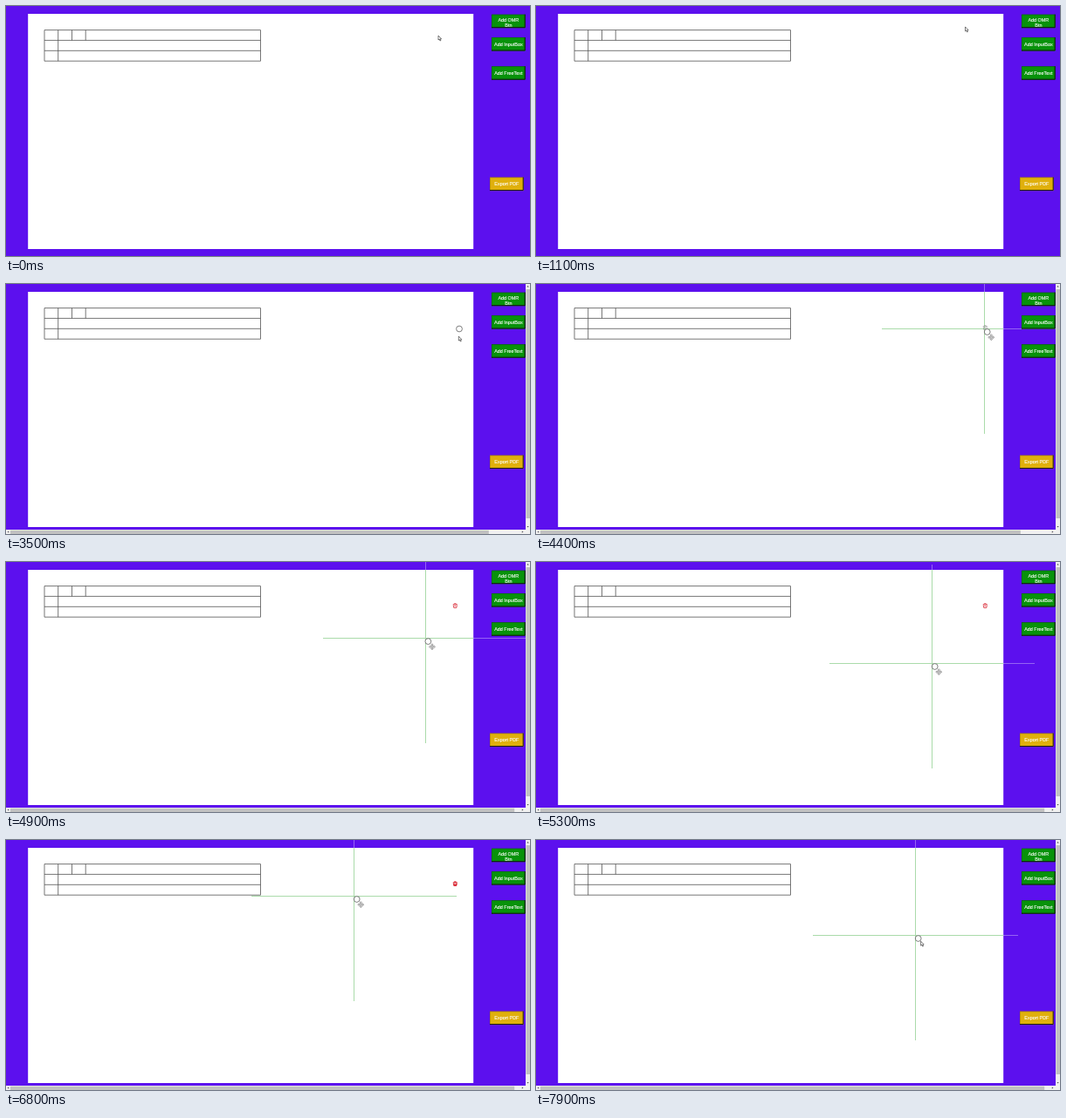
Animation of 600 by 287 pixels, one loop 8 s. Source, as an HTML page:

```html
<!DOCTYPE html>
<html lang="en">
<head>
<meta charset="utf-8">
<title>Form template editor</title>
<style>
  html, body { margin: 0; width: 100%; height: 100%; overflow: hidden; background: #5c10ee; }
  svg { display: block; width: 100%; height: 100%; }
  text { font: 5.45px "Liberation Sans", Arial, sans-serif; fill: #fff; stroke: #fff; stroke-width: .12; text-anchor: middle; }
  .table { fill: none; stroke: #555; stroke-width: .8; }
  .off { display: none; }
</style>
</head>
<body>
<svg viewBox="0 0 600 287">
  <defs>
    <clipPath id="sheet"><rect x="25" y="9" width="510" height="270"/></clipPath>
  </defs>
  <rect width="600" height="287" fill="#5c10ee"/>
  <rect x="25.2" y="9" width="510" height="270" fill="#fff"/>
  <path class="table" d="M44 27.6H291.5V63.2H44ZM44 39.4H291.5M44 51.3H291.5M59.7 27.6V63.2M75.5 27.6V39.4M91.2 27.6V39.4"/>

  <g id="guides">
    <path stroke="#fff" stroke-opacity=".35"/>
    <path stroke="#aadbaa" clip-path="url(#sheet)"/>
  </g>
  <g id="trash" stroke-width=".8">
    <path d="M511.8 48.7H516.8M512.8 48.4L513.6 47.8H515L515.8 48.4M512.2 49.4L512.8 52.6H515.8L516.4 49.4"/>
    <path d="M513.4 50.4H515.2"/>
  </g>
  <circle id="bubble" r="3.4" fill="#fff" stroke="#555" stroke-width=".75"/>

  <g id="buttons"></g>

  <g id="bars">
    <path d="M595 0H600V287H0V282H595Z" fill="#f1f1f1"/>
    <rect x="595.5" y="6" width="4.5" height="263" fill="#c1c1c1"/>
    <rect id="thumb" x="5" y="282.7" height="4.3" fill="#c1c1c1"/>
    <path d="M596.5 3.4L597.6 1.8L598.7 3.4ZM596.5 278L597.6 279.6L598.7 278ZM3.2 283.5L1.6 284.6L3.2 285.7ZM590.8 283.5L592.4 284.6L590.8 285.7Z" fill="#505050"/>
  </g>

  <g id="cursors" stroke="#222" stroke-linejoin="round" stroke-width=".6" fill="#fff">
    <path id="arrow" d="M-1.7 -3V2L-.5 1L.3 3L1.2 2.6L.4 .8H1.9Z"/>
    <path id="hand" d="M-1.7 -2.6Q-1 -3.6 -.3 -2.6V-.4L1.7 .1Q2.3 .4 2.1 1.3L1.6 3.8H-1.4L-3 1.2Q-2.9 .3 -1.7 1.2Z"/>
    <path id="move" stroke="#666" stroke-width=".5" fill="#eee" d="M0 -3.6L1.3 -2.1H.5V-.5H2.1V-1.3L3.6 0L2.1 1.3V.5H.5V2.1H1.3L0 3.6L-1.3 2.1H-.5V.5H-2.1V1.3L-3.6 0L-2.1 -1.3V-.5H-.5V-2.1H-1.3Z"/>
  </g>
</svg>
<script>
const LOOP = 8000, STEP = 100;
const ADD = 2900, HOVER = 4000, GRAB = 4200, DROP = 7900;
const GRIP = { x: 7.8, y: 9.7 };
const $ = id => document.getElementById(id);

// key points: time, x, y
const drag = [
  [GRAB, 515.8, 48], [4400, 513.5, 51.5], [5300, 453.5, 116.5], [5500, 443, 120.5],
  [6300, 393.5, 72], [6800, 398.5, 64.5], [7400, 401, 91.5], [DROP, 434.5, 109.5]
];
const approach = [
  [400, 496.7, 37], [600, 476, 24], [1000, 490, 27], [1900, 584.4, 25], [ADD, 582, 23],
  [3500, 520, 63], [GRAB, drag[0][1] + GRIP.x, drag[0][2] + GRIP.y]
];

const linear = p => p;
const smooth = p => p * p * (3 - 2 * p);

function along(keys, t, ease) {
  const i = keys.findIndex(k => k[0] > t);
  if (i === 0) return { x: keys[0][1], y: keys[0][2] };
  const [a, b] = i < 0 ? [keys.at(-1), keys.at(-1)] : [keys[i - 1], keys[i]];
  const p = ease((t - a[0]) / (b[0] - a[0] || 1));
  return i < 0 ? { x: a[1], y: a[2] }
    : { x: a[1] + (b[1] - a[1]) * p, y: a[2] + (b[2] - a[2]) * p };
}

function button(x, y, fill, lines, drop = 0) {
  const w = 38.7, h = 15.5, mid = y + h / 2 + 1.8 + drop;
  const labels = lines.map((s, i) =>
    `<text x="${x + w / 2}" y="${mid + (i - (lines.length - 1) / 2) * 6}">${s}</text>`).join("");
  return `<rect x="${x}" y="${y}" width="${w}" height="${h}" fill="${fill}"/>
    <path d="M${x + .3} ${y + h}V${y + .3}H${x + w}" fill="none" stroke="#000" stroke-opacity=".35" stroke-width=".6"/>
    <path d="M${x} ${y + h - .5}H${x + w - .5}V${y}" fill="none" stroke="#111"/>${labels}`;
}

const GREEN = "#08920a";
$("buttons").innerHTML =
  button(556, 9.7, GREEN, ["Add OMR", "Btn"], 1.4) +
  button(556, 36, GREEN, ["Add InputBox"]) +
  button(556, 69.2, GREEN, ["Add FreeText"]) +
  button(554, 196.6, "#e0b00c", ["Export PDF"]);

const show = (id, on) => $(id).classList.toggle("off", !on);
const place = (id, p) => $(id).setAttribute("transform", `translate(${p.x} ${p.y})`);
const pixel = v => Math.floor(v) + .5;

function draw(time) {
  const t = Math.floor(time % LOOP / STEP) * STEP;
  const cross = along(drag, t, linear);
  const pointer = t < GRAB ? along(approach, t, smooth)
    : { x: cross.x + GRIP.x, y: cross.y + GRIP.y };

  const kind = t >= HOVER && t < DROP ? "move" : pointer.x > 556 ? "hand" : "arrow";
  for (const id of ["arrow", "hand", "move"]) show(id, id === kind);
  place(kind, pointer);

  show("bubble", t >= ADD);
  place("bubble", { x: cross.x + 3.2, y: cross.y + 3.5 });

  show("guides", t >= HOVER);
  const x = pixel(cross.x), y = pixel(cross.y);
  const d = `M${x - 117.5} ${y}H${x + 117.5}M${x} ${y - 113.5}V${y + 120.5}`;
  for (const g of $("guides").children) g.setAttribute("d", d);

  // grey under the bubble, then a red outline, then solid red
  const solid = t >= 5500, ink = t < 4500 ? "#999" : "#d8232f";
  show("trash", t >= HOVER && t < 7500);
  $("trash").setAttribute("stroke", ink);
  $("trash").setAttribute("fill", solid ? ink : "none");
  $("trash").lastElementChild.setAttribute("stroke", solid ? "#fff" : ink);

  // the thumb shrinks while the guides reach past the view
  show("bars", t >= ADD);
  $("thumb").setAttribute("width", 584 * 595 / Math.max(602, cross.x + 118.5));
}

const start = performance.now();
function tick() {
  draw(performance.now() - start);
  requestAnimationFrame(tick);
}
tick();
</script>
</body>
</html>
```
